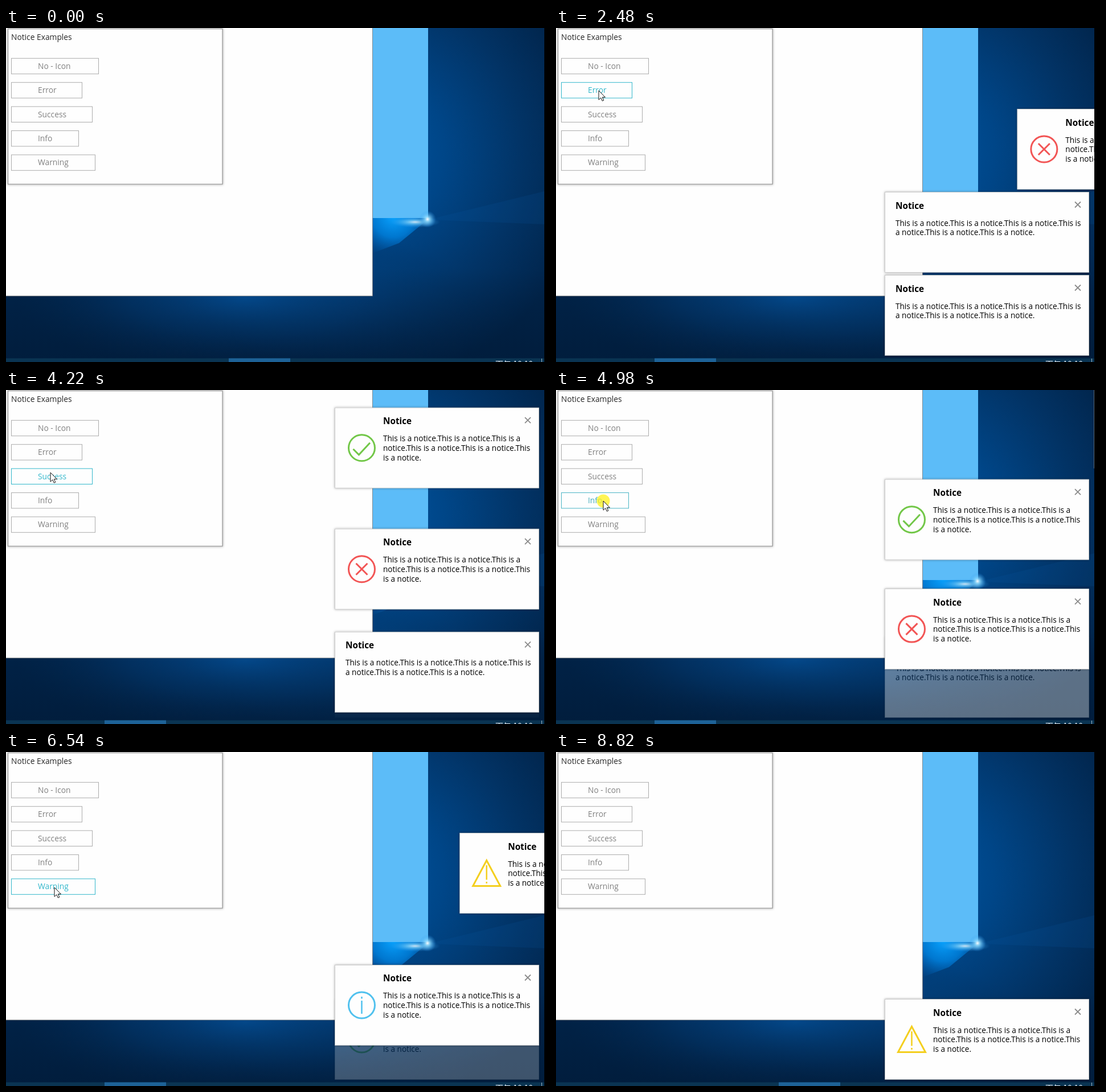
An HTML page that plays this animation: 955x587 px, repeating every 8890 ms.

```html
<!DOCTYPE html>
<html lang="en">
<head>
<meta charset="utf-8">
<title>Notice examples</title>
<style>
  html, body { margin: 0; width: 100%; height: 100%; overflow: hidden; background: #000; }
  svg { display: block; width: 100%; height: 100%; }
  text { font: 13.6px "Open Sans", "Noto Sans", sans-serif; white-space: pre; }
  .label { font-size: 13.8px; }
  .heading { font-size: 15.3px; font-weight: 700; }
  .clock { font: 14px "Noto Sans CJK SC", "Noto Sans CJK", "Noto Sans", sans-serif; fill: #e4edf4; }
  .icon { fill: none; stroke-width: 3; }
</style>
</head>
<body>
<svg id="stage" viewBox="0 0 955 587" preserveAspectRatio="none">
  <defs>
    <radialGradient id="sky" gradientUnits="userSpaceOnUse" cx="630" cy="220" r="400">
      <stop offset="0" stop-color="#0055a2"/>
      <stop offset=".35" stop-color="#004688"/>
      <stop offset=".7" stop-color="#023365"/>
      <stop offset="1" stop-color="#01244a"/>
    </radialGradient>
    <radialGradient id="floor">
      <stop offset="0" stop-color="#0454a0" stop-opacity=".9"/>
      <stop offset=".5" stop-color="#034484" stop-opacity=".55"/>
      <stop offset="1" stop-color="#02305e" stop-opacity="0"/>
    </radialGradient>
    <radialGradient id="beam" gradientUnits="userSpaceOnUse" cx="680" cy="330" r="75">
      <stop offset="0" stop-color="#0aa4ff"/>
      <stop offset=".5" stop-color="#0088e8" stop-opacity=".75"/>
      <stop offset="1" stop-color="#0060b8" stop-opacity="0"/>
    </radialGradient>
    <radialGradient id="spark">
      <stop offset="0" stop-color="#fff"/>
      <stop offset=".3" stop-color="#8fdcff" stop-opacity=".8"/>
      <stop offset="1" stop-color="#2b9cf0" stop-opacity="0"/>
    </radialGradient>
    <linearGradient id="dusk" x2="0" y2="1">
      <stop offset=".72" stop-color="#01162f" stop-opacity="0"/>
      <stop offset="1" stop-color="#01162f" stop-opacity=".5"/>
    </linearGradient>
    <filter id="shadow" x="-5%" y="-8%" width="110%" height="116%">
      <feDropShadow dx="0" dy="0" stdDeviation="2" flood-color="#000" flood-opacity=".35"/>
    </filter>
  </defs>

  <rect width="945" height="587" fill="url(#sky)"/>
  <ellipse cx="420" cy="475" rx="400" ry="135" fill="url(#floor)"/>
  <path d="M643 300H740V337L690 378 643 396Z" fill="url(#beam)"/>
  <path d="M740 337L945 287V345Z" fill="#0a5cab" opacity=".14"/>
  <rect width="945" height="587" fill="url(#dusk)"/>
  <rect x="600" width="141" height="334" fill="#5cbcf8"/>
  <ellipse cx="718" cy="341" rx="44" ry="10" fill="url(#spark)" opacity=".8"/>
  <circle cx="740" cy="336" r="15" fill="url(#spark)"/>

  <rect y="580.5" width="945" height="7" fill="#0a3452"/>
  <rect id="task" y="580.5" width="108" height="7" fill="#1d6297"/>
  <text class="clock" x="859" y="596">下午 10:10</text>
  <path d="M940.5 581V587" stroke="#9fb4c4"/>

  <rect x="-2" y="-2" width="645.5" height="473" fill="#fefefe" stroke="#777" stroke-width=".8"/>
  <rect x="3.5" y="1.5" width="376.5" height="273" fill="#fefefe" stroke="#a3a3a3" stroke-width="1.5" filter="url(#shadow)"/>
  <text class="label" x="9" y="21" fill="#262626">Notice Examples</text>
  <g id="buttons"></g>
  <g id="cards"></g>
  <rect x="945" width="10" height="587"/>
  <circle id="click" r="11.5" fill="#fff21c" opacity=".75"/>
  <path id="cursor" d="M0 0V16.2L3.8 12.7 6.3 18.2 8.8 17.1 6.4 11.7H11.4Z" fill="#fff" stroke="#111"/>
</svg>

<script>
const LOOP = 8890, LIFE = 3016, MOVE = 460;
const FIRST_DROP = 28, STAGGER = 66;
const HOVER_FADE = 300;
const CARD_X = 577.5, CARD_TOP = 434.5, SLOT = 146, EDGE = 945;

const $ = id => document.getElementById(id);
const clamp = v => Math.min(1, Math.max(0, v));
const easeInOut = p => p < .5 ? 8 * p ** 4 : 1 - 8 * (1 - p) ** 4;
const progress = (t, start) => easeInOut(clamp((t - start) / MOVE));
const smooth = p => p * p * (3 - 2 * p);

const ring = '<circle r="23"/>';
const icons = {
  error: ['#f25555', ring + '<path d="M-10-10L10 10M10-10L-10 10"/>'],
  success: ['#72c748', ring + '<path d="M-15 2L-5 12 14.5-9"/>'],
  info: ['#50c1ee', ring + '<path d="M0-8V15M0-15V-11.5" stroke-width="2.5"/>'],
  warning: ['#f4cf1f', '<path d="M0-22.5L24 22.5H-24Z"/><path d="M0-14V11.5M0 15V18" stroke-width="2.5"/>']
};

// Notices in order of appearance; slot counts upwards from the bottom.
const notices = [
  { open: 854, slot: 0 },
  { open: 1717, slot: 1 },
  { open: 2268, slot: 2, icon: 'error' },
  { open: 3256, slot: 3, icon: 'success' },
  { open: 4980, slot: 3, icon: 'info' },
  { open: 6323, slot: 2, icon: 'warning' }
];

const buttons = [['No - Icon', 153], ['Error', 124], ['Success', 142], ['Info', 118], ['Warning', 147]]
  .map(([label, width], i) => ({ label, width, y: 53.3 + i * 42.4 }));

// Pointer path: time, x, y
const path = [
  [70, 874, 587], [780, 100, 72], [1050, 100, 72], [1300, 97, 108], [1450, 97, 108],
  [1600, 100, 72], [1850, 100, 72], [2150, 75, 110], [2500, 75, 110], [3050, 78, 145],
  [4250, 78, 145], [4480, 83, 195], [5900, 83, 195], [6150, 85, 238], [7000, 85, 238],
  [7480, 663, 396], [7800, 880, 587]
];

function pointerAt(t) {
  const i = path.findIndex(k => k[0] > t);
  if (i < 1) return null;
  const [t0, x0, y0] = path[i - 1], [t1, x1, y1] = path[i];
  const p = smooth((t - t0) / (t1 - t0));
  return [x0 + (x1 - x0) * p, y0 + (y1 - y0) * p];
}

function cardMarkup({ icon }) {
  const lines = icon
    ? ['This is a notice.This is a notice.This is a', 'notice.This is a notice.This is a notice.This', 'is a notice.']
    : ['This is a notice.This is a notice.This is a notice.This is', 'a notice.This is a notice.This is a notice.'];
  const x = icon ? 84.5 : 18.5;
  const body = lines.map((line, i) => `<text x="${x}" y="${59 + i * 16.8}">${line}</text>`).join('');
  const mark = icon
    ? `<g class="icon" transform="translate(47 70.5)" stroke="${icons[icon][0]}">${icons[icon][1]}</g>` : '';
  return `<g><rect width="358" height="141" fill="#fefefe" stroke="#c4c4c4" stroke-width=".8" filter="url(#shadow)"/>
    <text class="heading" x="${x}" y="29">Notice</text>${body}${mark}
    <path d="M333.5 17L343.5 27M343.5 17L333.5 27" stroke="#8b8b8b" stroke-width="1.8"/></g>`;
}

$('cards').innerHTML = notices.map(cardMarkup).join('');
$('buttons').innerHTML = buttons.map(b =>
  `<g><rect x="9.5" y="${b.y}" width="${b.width}" height="27.4" fill="none"/>
   <text class="label" x="56" y="${b.y + 18.4}">${b.label}</text></g>`).join('');
const cardNodes = [...$('cards').children], buttonNodes = [...$('buttons').children];

function cardTop(j, t) {
  const card = notices[j];
  let slot = card.slot;
  for (let i = 0; i < j; i++) {
    const close = notices[i].open + LIFE, rank = j - i - 1;
    if (card.open < close)
      slot += (rank - slot) * progress(t, close + FIRST_DROP + rank * STAGGER);
  }
  return CARD_TOP - slot * SLOT;
}

function hoverAmount(b, t) {
  const samples = 20;
  let hits = 0;
  for (let i = 0; i < samples; i++) {
    const p = pointerAt(t - i * HOVER_FADE / samples);
    if (p && p[0] > 9 && p[0] < 9 + b.width && p[1] > b.y && p[1] < b.y + 27.4) hits++;
  }
  return hits / samples;
}

function mix(from, to, p) {
  return `rgb(${from.map((v, i) => Math.round(v + (to[i] - v) * p))})`;
}

function draw(t) {
  $('task').setAttribute('x', t < 70 || t >= 8820 ? 391 : 173);

  const pointer = pointerAt(t);
  const pressed = notices.some(n => t > n.open - 60 && t < n.open + 120);

  buttons.forEach((b, i) => {
    const amount = hoverAmount(b, t) * (pressed ? .8 : 1);
    const [box, label] = buttonNodes[i].children;
    box.setAttribute('stroke', mix([172, 172, 172], [50, 183, 203], amount));
    label.setAttribute('fill', mix([128, 128, 128], [50, 183, 203], amount));
  });

  notices.forEach((n, j) => {
    const node = cardNodes[j], fade = progress(t, n.open + LIFE);
    const visible = t > n.open && fade < 1;
    node.setAttribute('visibility', visible ? 'visible' : 'hidden');
    if (!visible) return;
    const x = EDGE + (CARD_X - EDGE) * progress(t, n.open);
    node.setAttribute('transform', `translate(${x} ${cardTop(j, t)})`);
    node.setAttribute('opacity', 1 - fade);
  });

  $('cursor').setAttribute('visibility', pointer ? 'visible' : 'hidden');
  $('click').setAttribute('visibility', pointer && pressed ? 'visible' : 'hidden');
  if (pointer)
    for (const id of ['cursor', 'click']) $(id).setAttribute('transform', `translate(${pointer})`);
}

const start = performance.now();
function tick() {
  draw((performance.now() - start) % LOOP);
  requestAnimationFrame(tick);
}
tick();
</script>
</body>
</html>
```
